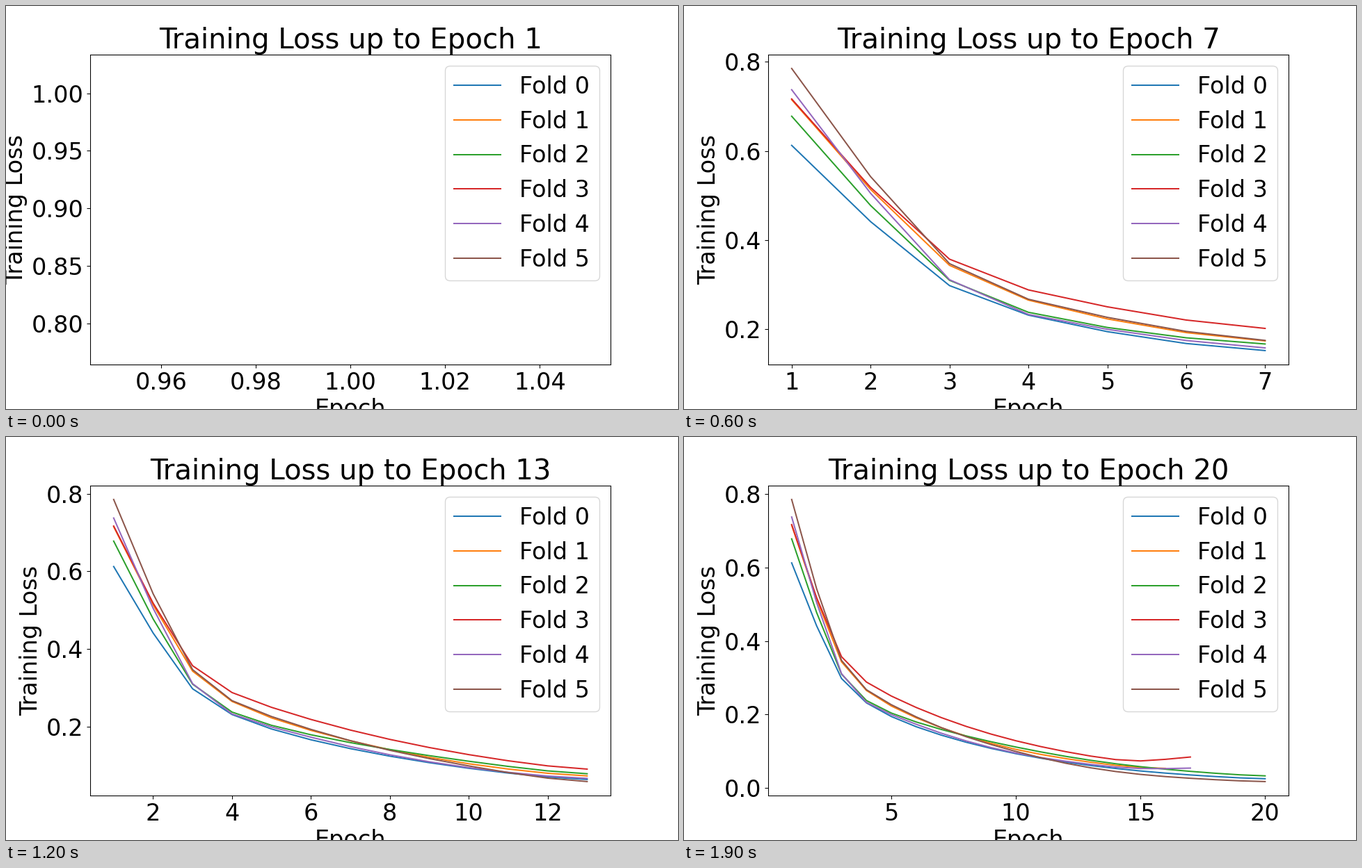
Animation of 966 by 580 pixels, one loop 2 s. Source, as a matplotlib script:

```python
import numpy as np
import matplotlib.pyplot as plt
from matplotlib.animation import FuncAnimation

EPOCHS = 20
INTERVAL = 100
RADIUS = 4
SCALE = 0.966  # a 10 x 6 inch chart shrunk to the stage

# Loss of each fold at a few epochs, and the epoch at which it stops.
KNOTS = [1, 2, 3, 5, 10, 15, 20]
FOLDS = [
    ([.7764, .332, .267, .190, .092, .0455, .0235], 20),
    ([.906, .390, .303, .219, .103, .053, .050], 16),
    ([.868, .355, .265, .200, .111, .057, .031], 20),
    ([.910, .383, .322, .248, .127, .066, .140], 17),
    ([.957, .366, .252, .200, .093, .049, .066], 17),
    ([1.0216, .377, .301, .225, .099, .0355, .016], 20),
]

kernel = np.exp(-0.5 * np.arange(-RADIUS, RADIUS + 1) ** 2)
kernel /= kernel.sum()


def loss_curve(points, length):
    """Piecewise exponential decay through the key points."""
    epochs = np.arange(1, length + 1)
    return np.exp(np.interp(epochs, KNOTS, np.log(points)))


def smooth(values):
    """Gaussian smoothing (sigma 1) with mirrored ends."""
    padded = np.pad(values, RADIUS, mode="symmetric")
    return np.convolve(padded, kernel, mode="valid")


losses = [loss_curve(points, length) for points, length in FOLDS]

plt.rcParams.update({"font.family": "DejaVu Sans", "font.size": 25})
for key in ("font.size", "lines.linewidth", "patch.linewidth",
            "axes.linewidth", "axes.titlepad", "axes.labelpad",
            "xtick.major.size", "xtick.major.width", "xtick.major.pad",
            "ytick.major.size", "ytick.major.width", "ytick.major.pad"):
    plt.rcParams[key] *= SCALE

fig, ax = plt.subplots(figsize=(9.66, 5.8), dpi=100)


def draw(frame):
    epoch = frame + 1
    ax.clear()
    for k, loss in enumerate(losses):
        seen = smooth(loss[:epoch])
        ax.plot(np.arange(1, len(seen) + 1), seen, label=f"Fold {k}")
    ax.set_title(f"Training Loss up to Epoch {epoch}")
    ax.set_xlabel("Epoch")
    ax.set_ylabel("Training Loss")
    ax.legend(loc="upper right")
    return ax.get_children()


anim = FuncAnimation(fig, draw, frames=EPOCHS, interval=INTERVAL,
                     init_func=lambda: draw(0), repeat=True, repeat_delay=0)
plt.show()
```
